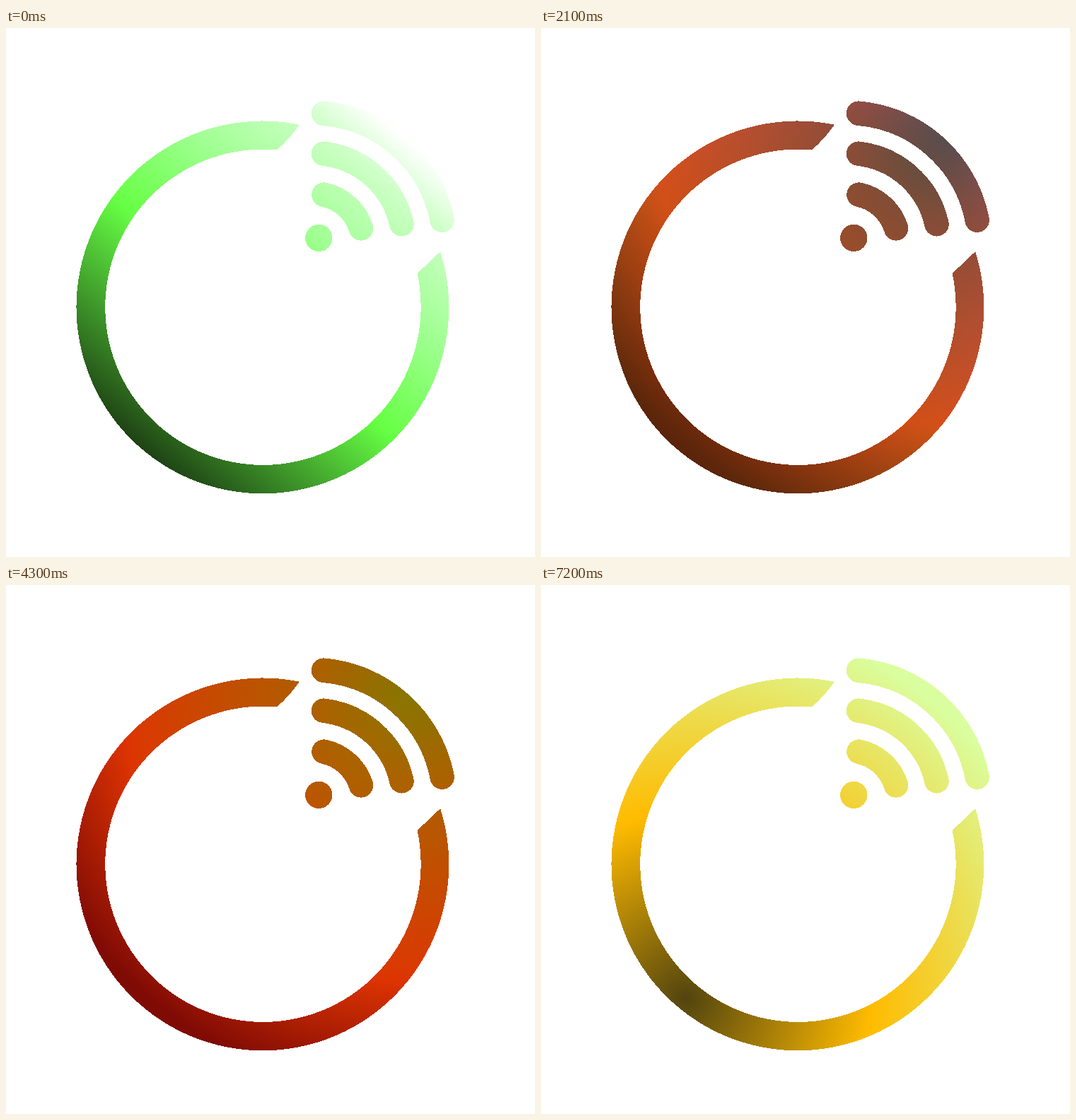
Write an HTML page without scripts that moves like this. It is 748 px wide and 748 px high and loops after 8 s.

```html
<!DOCTYPE html>
<html lang="en">
<head>
<meta charset="utf-8">
<title>Signal ring</title>
<style>
  html, body { margin: 0; width: 100%; height: 100%; overflow: hidden; background: #fff; }
  svg { display: block; width: 100%; height: 100%; }
  rect { width: 748px; height: 748px; }

  /* Each layer fades in over ten 100 ms steps and stays until the loop restarts. */
  .fade { opacity: 0; animation: 8s steps(10, start) infinite; }
  .red { animation-name: red; }
  .amber { animation-name: amber; }
  .gold { animation-name: gold; }
  @keyframes red { 0%, 18.75% { opacity: 0 } 31.25%, 100% { opacity: 1 } }
  @keyframes amber { 0%, 48.75% { opacity: 0 } 61.25%, 100% { opacity: 1 } }
  @keyframes gold { 0%, 78.75% { opacity: 0 } 91.25%, 100% { opacity: 1 } }
</style>
</head>
<body>
<svg viewBox="0 0 748 748">
  <defs>
    <linearGradient id="green" gradientUnits="userSpaceOnUse" x1="192" y1="595" x2="567" y2="156.5">
      <stop offset="0" stop-color="#1e4214"/>
      <stop offset=".423" stop-color="#66ff44"/>
      <stop offset=".67" stop-color="#a0ff92"/>
      <stop offset=".88" stop-color="#ccffc5"/>
      <stop offset="1" stop-color="#fff"/>
    </linearGradient>
    <radialGradient id="red" gradientUnits="userSpaceOnUse" cx="578" cy="146" r="577">
      <stop offset="0" stop-color="#080000"/>
      <stop offset=".22" stop-color="#680000"/>
      <stop offset=".72" stop-color="#ff0404"/>
      <stop offset="1" stop-color="#781606"/>
    </radialGradient>
    <radialGradient id="amber" gradientUnits="userSpaceOnUse" cx="567" cy="160" r="560">
      <stop offset="0" stop-color="#ffec00"/>
      <stop offset=".68" stop-color="#c07000"/>
      <stop offset="1" stop-color="#880005"/>
    </radialGradient>
    <radialGradient id="gold" gradientUnits="userSpaceOnUse" cx="205" cy="585" r="548">
      <stop offset="0" stop-color="#52440f"/>
      <stop offset=".478" stop-color="#ffbb00"/>
      <stop offset="1" stop-color="#dafe9f"/>
    </radialGradient>

    <mask id="icon" maskUnits="userSpaceOnUse" x="0" y="0" width="748" height="748">
      <g fill="#fff" shape-rendering="crispEdges">
        <path d="M415 136.7A263.4 263.4 0 1 0 614.2 316L581.5 347A223.2 223.2 0 1 1 383 172.4Q401 157 415 136.7Z"/>
        <circle cx="442.3" cy="296.8" r="19.2"/>
        <g fill="none" stroke="#fff" stroke-width="34.5" stroke-linecap="round">
          <path d="M449.5 235.7A70 70 0 0 1 502 283.3"/>
          <path d="M449 177.7A128 128 0 0 1 559.5 277.3"/>
          <path d="M449 120.7A187 187 0 0 1 616.7 271.7"/>
        </g>
      </g>
    </mask>
  </defs>

  <g mask="url(#icon)">
    <rect fill="url(#green)"/>
    <rect class="fade red" fill="url(#red)"/>
    <rect class="fade amber" fill="url(#amber)"/>
    <rect class="fade gold" fill="url(#gold)"/>
  </g>
</svg>
</body>
</html>
```
